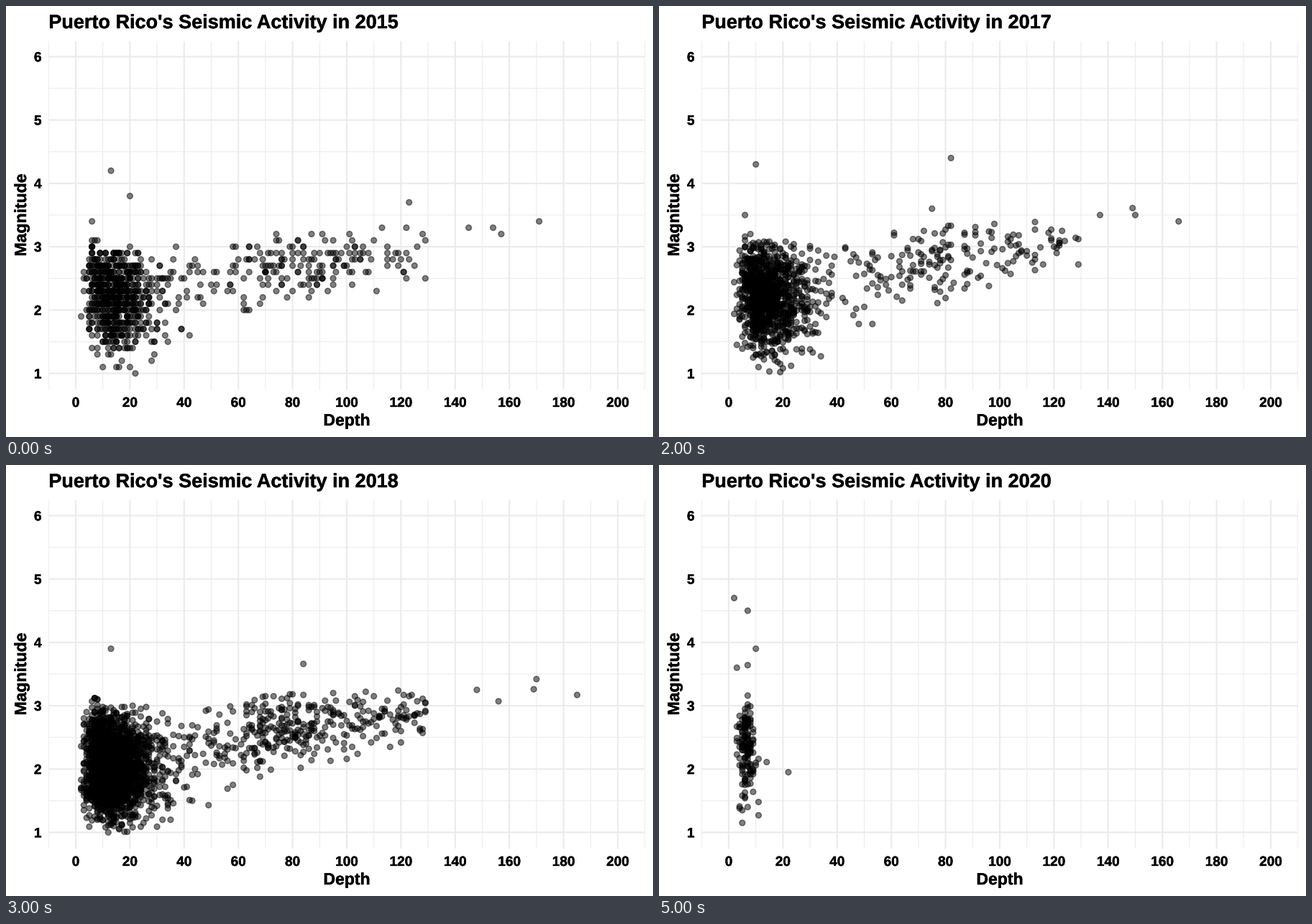
Recreate the animation shown at these times as a matplotlib script. Size 900 by 600 pixels, loop 6 s.

```python
import numpy as np
import matplotlib.pyplot as plt
from matplotlib import patheffects
from matplotlib.animation import FuncAnimation

W, H, DPI = 900, 600, 100
PX = 72 / DPI  # points per pixel
GRID = "#ebebeb"
LEFT, RIGHT, TOP, BOTTOM = 59.3, 888.7, 48.5, 533.5
FIRST_YEAR = 2015

plt.rcParams.update({
    "font.family": "Liberation Sans",
    "font.weight": "bold",
    "text.hinting": "none",
})


def near_surface(rng, n, depth, shape, mag, spread, cap):
    """Skewed shallow cloud, a little stronger around a depth of 7."""
    d = rng.gamma(shape, depth / shape, n)
    m = rng.normal(mag, spread, n)
    keep = (d > 1.5) & (m > 1) & (m < cap)
    d, m = d[keep], m[keep]
    return d, m + 0.2 * np.exp(-((d - 7) / 2) ** 2)


def far_band(rng, n, start, middle, end):
    """Sparse band whose magnitude rises and narrows with depth."""
    d = np.concatenate([rng.uniform(28, 130, int(0.68 * n)),
                        rng.normal(78, 12, int(0.32 * n))])
    level = np.interp(d, [30, 72, 125], [start, middle, end])
    spread = np.interp(d, [30, 70, 130], [0.34, 0.3, 0.2])
    return d, level + spread * np.clip(rng.normal(size=d.size), -2.3, 1.9)


def quakes(seed, near, depth, mag, cap, far=0, middle=0, end=0,
           shape=5, spread=0.43, digits=2, peaks=()):
    rng = np.random.default_rng(seed)
    d1, m1 = near_surface(rng, near, depth, shape, mag, spread, cap)
    d2, m2 = far_band(rng, far, mag + 0.1, middle, end)
    cloud = np.column_stack([np.round(np.concatenate([d1, d2])),
                             np.round(np.concatenate([m1, m2]), digits)])
    return np.vstack([cloud, peaks])


# Clouds follow the rules above; peaks are the few events far outside them.
YEARS = [
    quakes(15, 760, 15, 2.2, 2.98, 205, 2.65, 2.9, digits=1,
           peaks=[(13, 4.2), (20, 3.8), (6, 3.4), (123, 3.7), (145, 3.3),
                  (154, 3.3), (157, 3.2), (171, 3.4)]),
    quakes(16, 1650, 13, 2.22, 3.02, 210, 2.68, 2.95, digits=1,
           peaks=[(4, 4.6), (11, 4.3), (5, 4.0), (9, 3.9), (13, 3.7),
                  (22, 3.7), (89, 3.7), (131, 3.9), (151, 3.8), (176, 3.5)]),
    quakes(17, 1080, 15, 2.2, 3.08, 185, 2.75, 3.02,
           peaks=[(10, 4.3), (6, 3.5), (82, 4.4), (75, 3.6), (137, 3.5),
                  (149, 3.61), (150, 3.5), (166, 3.4)]),
    quakes(18, 2100, 14.5, 2.0, 3.0, 370, 2.6, 2.86,
           peaks=[(13, 3.9), (84, 3.66), (148, 3.25), (156, 3.07),
                  (169, 3.26), (170, 3.42), (185, 3.17)]),
    quakes(19, 2550, 13.5, 1.88, 2.82, 370, 2.42, 2.74, shape=4.2,
           peaks=[(6, 5.0), (3, 4.7), (6, 4.7), (13, 4.6), (3, 4.3),
                  (5, 4.2), (13, 4.1), (10, 3.9), (75, 3.48), (165, 3.0),
                  (160, 2.41), (191, 3.35)]),
    quakes(20, 150, 6.8, 2.2, 3.0, shape=14, spread=0.4,
           peaks=[(2, 4.7), (7, 4.5), (10, 3.9), (3, 3.6), (7, 3.64),
                  (14, 2.11), (22, 1.95)]),
]

fig = plt.figure(figsize=(W / DPI, H / DPI), dpi=DPI, facecolor="white")
ax = fig.add_axes([LEFT / W, 1 - BOTTOM / H,
                   (RIGHT - LEFT) / W, (BOTTOM - TOP) / H])
ax.set_xlim(-10, 210)
ax.set_ylim(0.75, 6.25)
ax.axis("off")


def grid(draw, values, width):
    for v in values:
        draw(v, color=GRID, lw=width * PX, zorder=width / 4, snap=False)


def label(x, y, text, size, ha="center", **kw):
    heavier = patheffects.withStroke(linewidth=0.4 * PX, foreground="black")
    return fig.text(x / W, 1 - y / H, text, fontsize=size * PX, ha=ha,
                    va="baseline", color="black", path_effects=[heavier], **kw)


grid(ax.axvline, range(-10, 211, 20), 1.07)
grid(ax.axhline, np.arange(1.5, 6), 1.07)
grid(ax.axvline, range(0, 201, 20), 2.13)
grid(ax.axhline, range(1, 7), 2.13)

for depth in range(0, 201, 20):
    label(97 + 3.77 * depth, 558, str(depth), 19)
for mag in range(1, 7):
    label(49.5, 606.5 - 88.2 * mag, str(mag), 19, ha="right")
label(474, 584, "Depth", 23)
label(28, 291, "Magnitude", 23, rotation=90, rotation_mode="anchor")
title = label(59.3, 31, "", 27.05, ha="left")

dots = ax.scatter([], [], facecolor="black", edgecolor="black", alpha=0.5,
                  linewidth=1.4 * PX, zorder=3)
dots.set_sizes([(7.8 * PX) ** 2] * 2, DPI)


def update(i):
    dots.set_offsets(YEARS[i])
    title.set_text(f"Puerto Rico's Seismic Activity in {FIRST_YEAR + i}")
    return dots, title


anim = FuncAnimation(fig, update, frames=len(YEARS), interval=1000,
                     init_func=lambda: update(0), repeat=True, repeat_delay=0)
plt.show()
```
